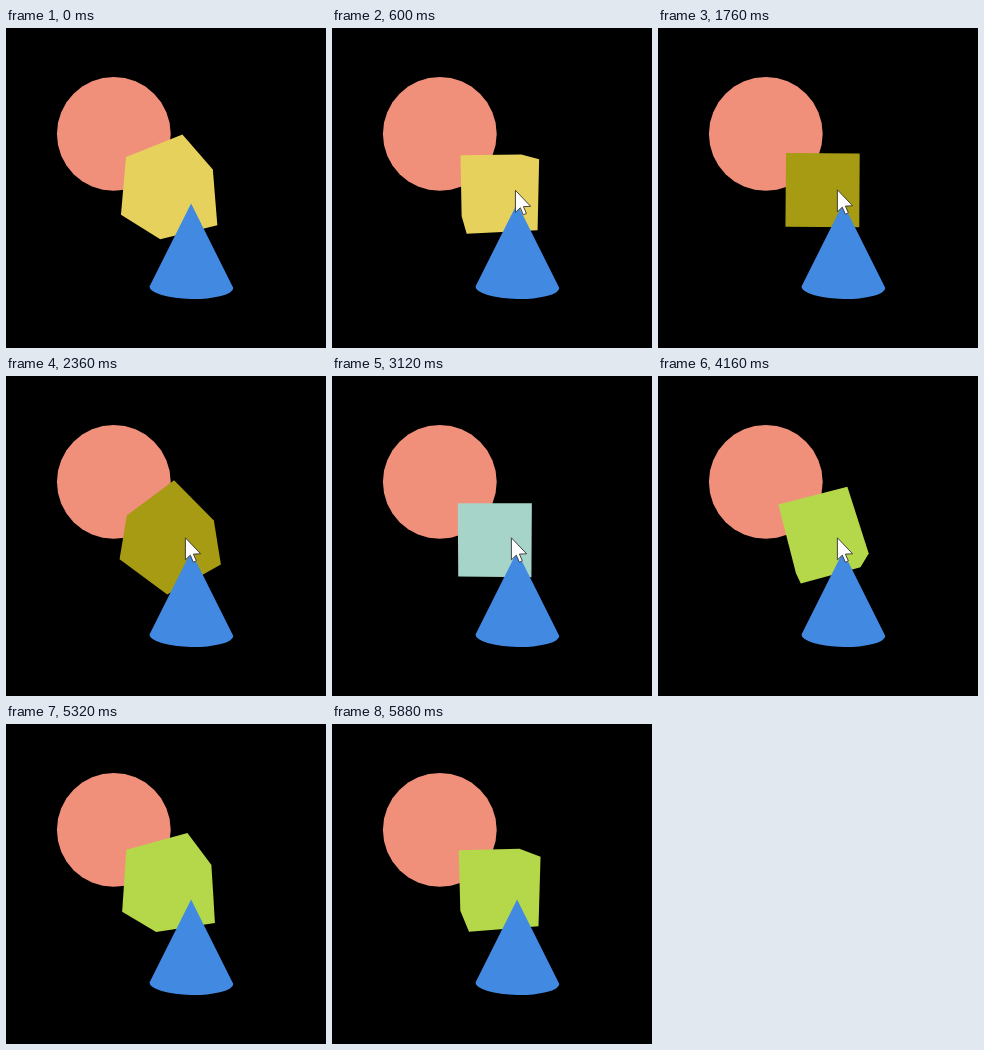
Animation of 320 by 320 pixels, one loop 5.92 s. Source, as an HTML page with a canvas:

```html
<!DOCTYPE html>
<html lang="en">
<head>
<meta charset="utf-8">
<title>Spinning cube</title>
<style>
  html, body { margin: 0; width: 100%; height: 100%; overflow: hidden; background: #000; }
  canvas { display: block; width: 320px; height: 320px; }
</style>
</head>
<body>
<canvas id="stage" width="320" height="320"></canvas>
<script>
const ctx = document.getElementById('stage').getContext('2d');
const LOOP = 5920, STEP = 40;
const CENTER = { x: 164.6, y: 162.3 };
const HALF = 33.2, DIST = 332;          // half edge and camera distance, in px
const START = -211.4, SPEED = 68.75;    // degrees, degrees per second
const REST = { x: 179.4, y: 161.8 };

const colors = [
  [0, '#e6d15c'],
  [1760, '#a69b12'],
  [2760, '#a6d4c8'],
  [3720, '#b5d84a']
];

const clamp = v => Math.min(1, Math.max(0, v));
const span = (t, a, b) => clamp((t - a) / (b - a));

// Turn about y by -angle, then about x by angle, then project.
function corner(x, y, z, s, c) {
  const px = x * c - z * s;
  const pz = x * s + z * c;
  const py = y * c - pz * s;
  const depth = y * s + pz * c;
  const k = HALF * DIST / (DIST - HALF * depth);
  return [CENTER.x + px * k, CENTER.y - py * k];
}

function cubePoints(t) {
  const a = (START + SPEED * t / 1000) * Math.PI / 180;
  const s = Math.sin(a), c = Math.cos(a);
  const pts = [];
  for (const x of [-1, 1])
    for (const y of [-1, 1])
      for (const z of [-1, 1]) pts.push(corner(x, y, z, s, c));
  return pts;
}

function chain(pts) {
  const out = [];
  for (const p of pts) {
    while (out.length > 1) {
      const [a, b] = out.slice(-2);
      if ((b[0] - a[0]) * (p[1] - a[1]) - (b[1] - a[1]) * (p[0] - a[0]) > 0) break;
      out.pop();
    }
    out.push(p);
  }
  return out.slice(0, -1);
}

function hull(pts) {
  const sorted = pts.sort((a, b) => a[0] - b[0] || a[1] - b[1]);
  return chain(sorted).concat(chain(sorted.slice().reverse()));
}

function polygon(pts, fill) {
  ctx.beginPath();
  pts.forEach(([x, y]) => ctx.lineTo(x, y));
  ctx.closePath();
  ctx.fillStyle = fill;
  ctx.fill();
}

// The sphere is a mesh, so its outline has 32 short sides.
function drawSphere() {
  const pts = Array.from({ length: 32 }, (_, i) => {
    const a = i * Math.PI / 16;
    return [107.8 + 56.9 * Math.cos(a), 105.9 + 56.9 * Math.sin(a)];
  });
  polygon(pts, '#f0907b');
}

function drawCone() {
  ctx.fillStyle = '#428ae1';
  ctx.beginPath();
  ctx.moveTo(185.1, 175.5);
  ctx.ellipse(185.4, 259.3, 41.9, 11.7, 0.018, 0, Math.PI);
  ctx.closePath();
  ctx.fill();
}

function drawCursor(t) {
  const away = Math.pow(1 - span(t, 200, 680), 2) + Math.pow(span(t, 4920, 5320), 2);
  if (away >= 1) return;
  ctx.save();
  ctx.translate(REST.x + 145 * away, REST.y + 20 * away);
  polygon([[0, 0], [0, 22], [4.9, 17.4], [7.9, 24.4], [11, 23.1], [8, 16.3], [15.2, 16]], '#fff');
  ctx.strokeStyle = '#333';
  ctx.lineWidth = 0.9;
  ctx.stroke();
  ctx.restore();
}

function draw(t) {
  ctx.fillStyle = '#000';
  ctx.fillRect(0, 0, 320, 320);
  drawSphere();
  const color = colors.filter(([from]) => t >= from).pop()[1];
  polygon(hull(cubePoints(t)), color);
  drawCone();
  drawCursor(t);
}

const begin = performance.now();
function frame() {
  const t = (performance.now() - begin) % LOOP;
  draw(Math.floor(t / STEP) * STEP);
  requestAnimationFrame(frame);
}
frame();
</script>
</body>
</html>
```
